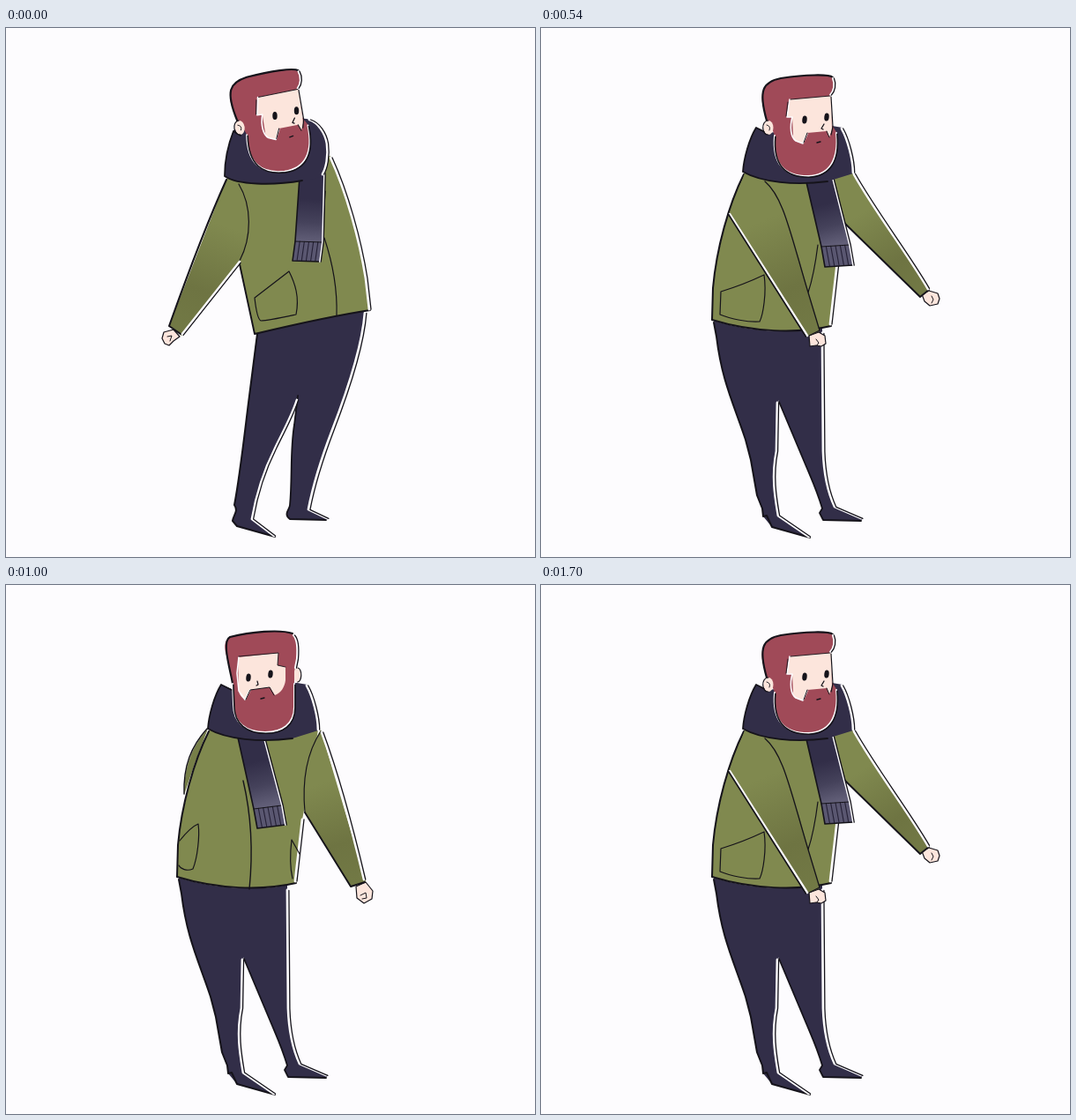
An HTML page with a canvas that plays this animation: 600x600 px, repeating every 2000 ms.

```html
<!DOCTYPE html>
<html lang="en">
<head>
<meta charset="utf-8">
<title>Bearded man swaying</title>
<style>
html, body { margin: 0; width: 100%; height: 100%; overflow: hidden; background: #fdfcfe; }
canvas { display: block; width: 600px; height: 600px; }
</style>
</head>
<body>
<canvas id="stage" width="600" height="600"></canvas>
<script>
const ctx = document.getElementById('stage').getContext('2d');
const PAPER = '#fdfcfe', INK = '#15131a', NAVY = '#322e48', GREEN = '#80894f';
const SHADE = '#6e7442', HAIR = '#a04a58', SKIN = '#fce5dc';
ctx.lineJoin = ctx.lineCap = 'round';

function fill(color, d) {
  ctx.fillStyle = color;
  ctx.fill(new Path2D(d));
}

function line(d, width = 1.2, color = INK) {
  ctx.strokeStyle = color;
  ctx.lineWidth = width;
  ctx.stroke(new Path2D(d));
}

// Paper-coloured gap with a thin pen line just outside it.
function rim(d, dx = 1.9, dy = 0.4, gap = 2.8) {
  line(d, gap, PAPER);
  ctx.save();
  ctx.translate(dx, dy);
  line(d, 1.3);
  ctx.restore();
}

function fade(x0, y0, x1, y1, stops) {
  const g = ctx.createLinearGradient(x0, y0, x1, y1);
  stops.forEach(([at, color]) => g.addColorStop(at, color));
  return g;
}

function sleeve(d, x0, y0, x1, y1) {
  fill(fade(x0, y0, x1, y1, [[0.25, GREEN], [0.7, SHADE], [1, '#727945']]), d);
}

function hand(d, fingers) {
  fill(SKIN, d);
  line(d, 1.2);
  line(fingers, 1);
}

function eyes(x1, y1, x2, y2) {
  ctx.fillStyle = INK;
  for (const [x, y] of [[x1, y1], [x2, y2]]) {
    ctx.beginPath();
    ctx.ellipse(x, y, 2.7, 4.6, 0.1, 0, 7);
    ctx.fill();
  }
}

function ear(x, y, rx, ry, side) {
  ctx.beginPath();
  ctx.ellipse(x, y, rx, ry, 0, 0, 7);
  ctx.fillStyle = SKIN;
  ctx.fill();
  ctx.strokeStyle = INK;
  ctx.lineWidth = 1.2;
  ctx.beginPath();
  ctx.ellipse(x + side * 0.8, y, rx, ry, 0, side < 0 ? 1.5 : -1.5, side < 0 ? 4.8 : 1.6);
  ctx.stroke();
}

// Hanging scarf end: corners run top-left, top-right, bottom-right, bottom-left.
function scarfTail(a, b, c, d, drop) {
  const [dx, dy] = drop;
  const g = fade((a[0] + b[0]) / 2, a[1], (c[0] + d[0]) / 2, c[1],
    [[0.35, NAVY], [0.7, '#45425b'], [1, '#625f78']]);
  fill(g, `M${a}L${b}L${c}L${d}Z`);
  const c2 = [c[0] + dx, c[1] + dy], d2 = [d[0] + dx, d[1] + dy];
  fill('#5a5771', `M${d}L${c}L${c2}L${d2}Z`);
  for (let i = 1; i < 6; i++) {
    const k = i / 6, x = d[0] + (c[0] - d[0]) * k, y = d[1] + (c[1] - d[1]) * k;
    line(`M${x} ${y}l${dx} ${dy - 1}`, 1.1, '#252136');
  }
  line(`M${d}L${c}`, 1.2);
  line(`M${a}L${d}L${d2}L${c2}`, 1.6);
  rim(`M${b}L${c}L${c2}`, 1.2, 0, 1.8);
}

function legsRight() {
  fill(NAVY, 'M285 343L407 320C404 362 387 412 370 456C357 490 348 520 343 546L365 556L364 558L322 557C314 551 322 546 322 541C325 510 322 480 327 450L331 416C325 440 314 458 305 477C291 505 284 528 279 557L306 577L262 565L257 559C258 552 264 548 259 541C265 510 270 465 275 425Z');
  line('M285 347L275 425C270 465 265 510 259 541C264 548 258 552 257 559L262 565L305 577', 2);
  line('M331 417L327 450C322 480 325 510 322 541C322 546 314 551 322 557L363 558', 1.8);
  rim('M407 323C404 362 387 412 370 456C357 490 348 520 343 546L364 556');
  rim('M330 422C324 441 314 458 305 477C291 505 284 528 279 557L304 576', 1.6, 0);
}

function legsLeft() {
  fill(NAVY, 'M196 332C235 345 290 347 319 340L320 480C321 510 327 530 333 543L365 556L363 559L320 558L316 550L319 545C313 525 307 512 302 500L269 422L268 480C262 510 267 535 270 553L306 578L262 566L252 554L251 545L245 530L238 490L232 467C218 425 205 400 199 350Z');
  line('M196 334L199 350C205 400 218 425 232 467L238 490L245 530L251 545L252 554L256 553L262 566L305 578', 2);
  line('M270 424L302 500C307 512 313 525 319 545L316 550L320 558L363 559', 1.8);
  rim('M319 346L320 480C321 510 327 530 333 543L363 556');
  rim('M268 425L267 480C261 510 266 535 269 553L304 577', 1.6, 0);
}

function coatRight() {
  fill(GREEN, 'M250 171L368 145C386 185 402 240 409 284L413 320C380 325 320 338 282 347L264 266Z');
  line('M265 268L282 347C320 338 380 325 413 320', 1.9);
  rim('M368 147C386 186 401 240 408 284L412 319', 2, 0);
}

function armBack() {
  hand('M190 342L179 345L177 352L180 358L185 360L190 355L197 350Z', 'M183 350L188 349L186 355');
  sleeve('M250 171L185 338L199 349L265 265C278 235 278 200 264 177Z', 252, 180, 192, 342);
  line('M250 172C230 216 205 282 185 338L198 347', 2);
  line('M264 177C279 202 279 237 265 264', 1.2);
  rim('M265 265L200 347', 1.1, 1.3);
}

function scarfLoopRight() {
  fill(NAVY, 'M258 116C252 132 248 150 248 168C262 178 302 179 336 173C348 172 356 170 360 166C366 154 368 130 360 119C356 110 350 105 341 103L290 100Z');
  line('M266 122L258 117C252 132 248 150 248 168C262 178 302 179 336 173', 1.8);
  rim('M344 104C354 107 362 119 364 131C366 146 363 159 359 166', 1.6, 0);
}

function coatLeft() {
  fill(GREEN, 'M231 164C214 198 200 250 195 295L194 331C240 345 290 347 329 338L336 266L345 220L354 164Z');
  line('M230 166C213 200 199 250 195 295L194 331C240 345 290 347 329 338', 2);
  rim('M336 266L328 336', 2, 0);
}

function scarfLoopLeft() {
  fill(NAVY, 'M244 113C236 126 230 148 229 163C250 175 288 179 325 174L354 165C355 150 348 124 342 113L330 111L290 115L258 119Z');
  line('M258 120L244 113C236 126 230 148 229 163C250 175 288 179 325 174', 1.8);
  rim('M341 114C348 126 354 150 354 164', 1.7, 0);
}

// Narrow pale seam around the beard, with the pen line outside it.
function beardLine(d) {
  line(d, 1.9, PAPER);
  ctx.save();
  ctx.translate(0.9, 1.3);
  line(d, 1.6);
  ctx.restore();
}

function headSide() {
  fill(HAIR, 'M252 90C246 64 260 57 290 55C312 53 328 53 331 57C334 64 333 72 328 77L330 110L335 118C338 150 327 167 303 168C276 168 262 154 265 122C262 112 254 104 252 90Z');
  line('M256 105C246 70 252 61 272 57C300 53 326 52 331 56', 2.2);
  rim('M331 57C334 64 332 72 328 76', 1.4, 0, 2.2);
  fill(SKIN, 'M282 81L329 77L330 116L327 124L324 117L302 119L298 131C291 130 287 128 286 123L285 101L279 101Z');
  line('M282 81L279 101L285 101C282 112 283 124 289 128L297 131L302 120', 1.6, PAPER);
  line('M283 81L328 77M280 84L278 100', 0.9);
  line('M329 78L331 112L329 121', 1.2);
  ear(258, 113, 5.5, 8, -1);
  line('M256 110Q261 111 259 116', 0.9);
  eyes(299, 104, 324, 101);
  line('M321 109L318 114L320 115', 1.3);
  line('M313 130L317 129', 1.3);
  line('M302 119L298 130M324 117L327 124', 1);
  beardLine('M335 119C338 150 327 167 303 168C276 168 262 154 265 122');
}

function headTilted() {
  ctx.save();
  ctx.translate(313, 163);
  ctx.rotate(-0.11);
  ctx.translate(-300, -168);
  headSide();
  ctx.restore();
}

function headTurning() {
  ear(267, 113, 4, 8, -1);
  ear(339, 96, 3, 7, 1);
  fill(HAIR, 'M256 80C251 62 262 56 285 52C305 48 320 45 326 49C333 53 335 62 335 75L338 95L345 115C349 148 335 163 311 163C286 163 270 148 273 118C268 105 260 98 256 80Z');
  line('M266 107C253 82 251 63 265 57C287 51 316 46 325 48', 2.2);
  rim('M326 49C333 53 334 62 334 75L337 92', 1.6, 0, 2.2);
  fill(SKIN, 'M277 80L325 70L327 83L333 84L334 104L327 121L323 111L303 114L299 126C290 126 283 122 282 118L281 98L275 98Z');
  line('M277 80L275 98L281 98C278 108 279 119 285 123L298 127L303 114', 1.6, PAPER);
  line('M278 80L324 71L327 83L333 85', 0.9);
  eyes(296, 101, 321, 97);
  line('M313 104L314 109L312 110', 1.2);
  line('M314 124L318 123', 1.3);
  line('M299 126L303 114L323 111L326 119', 1);
  beardLine('M345 117C349 148 335 163 311 163C286 163 270 148 273 118');
}

function headFront() {
  ear(330, 102, 4, 8, 1);
  fill(HAIR, 'M250 80C246 66 249 58 262 57C290 52 318 51 325 56C331 62 332 72 330 84L327 98L327 138C327 158 313 167 294 167C272 167 258 156 258 136L257 110C254 102 253 92 250 80Z');
  line('M257 112C255 98 244 64 254 59C277 53 311 50 325 55', 2.1);
  rim('M326 57C331 62 331 72 330 84L328 94', 1.5, 0, 2.2);
  fill(SKIN, 'M263 82L309 77L308 91L317 93L317 108C316 116 312 122 305 125L299 116L277 119L272 130C267 128 264 124 264 118Z');
  line('M264 82L262 100L264 120L271 130L277 119', 1.6, PAPER);
  line('M264 81L309 77L308 91L317 93', 0.9);
  eyes(275, 105, 300, 101);
  line('M285 109L286 113L284 114', 1.2);
  line('M289 129L293 128', 1.3);
  line('M272 130L277 119L299 116L304 125', 1);
  beardLine('M327 112L327 138C327 158 313 167 294 167C272 167 258 156 258 136L257 112');
}

function leanBack() {
  legsRight();
  coatRight();
  line('M361 238C370 265 376 295 375 326M362 185L359 238');
  line('M282 306L321 276C328 290 333 305 329 325C315 328 297 332 289 332C285 330 283 315 282 306Z');
  armBack();
  scarfTail([333, 168], [361, 165], [359, 243], [328, 242], [-3, 22]);
  scarfLoopRight();
  headTilted();
}

function reachForward() {
  legsLeft();
  coatLeft();
  line('M314 246C311 270 307 288 303 300');
  line('M204 299Q230 291 253 280C256 300 252 325 248 333C235 334 215 330 203 325Z');
  hand('M432 302L440 298L450 301L452 307L450 313L441 315L435 310Z', 'M443 304L445 308L443 312');
  sleeve('M354 163L440 298L430 305L344 221L335 190Z', 352, 172, 434, 300);
  line('M344 221L430 305L440 297', 1.9);
  rim('M355 166C380 210 415 255 439 296', 1.5, -0.7);
  hand('M304 349L315 345L322 349L323 358L318 361L312 360L305 361Z', 'M312 353L315 357L313 360');
  sleeve('M231 165L214 210L302 350L316 344L303 300C288 245 276 190 256 174Z', 236, 175, 308, 345);
  line('M254 174C275 192 282 230 303 300L316 343L304 349', 1.3);
  line('M214 211L302 349', 2.6, PAPER);
  line('M212.4 211L300.4 350', 1.6);
  scarfTail([301, 175], [331, 171], [350, 246], [318, 248], [4, 23]);
  scarfLoopLeft();
  headSide();
}

function turnMidway() {
  legsRight();
  coatRight();
  line('M343 249C349 280 354 305 356 331');
  line('M276 308L305 282C309 300 313 315 311 331C300 334 289 336 285 332C280 325 277 316 276 308Z');
  armBack();
  hand('M379 314L375 319L372 325L376 330L383 331L390 326L391 319Z', 'M374 325L380 322L380 327');
  sleeve('M368 147L432 224Q436 231 433 239L410 290L392 320L376 314L394 214Z', 385, 165, 386, 318);
  line('M372 154L394 214L377 313L391 319', 1.8);
  rim('M369 148L431 224Q435 231 432 239L409 290L392 319', 1.6, 0.4);
  scarfTail([314, 172], [345, 170], [339, 250], [308, 249], [-2, 22]);
  scarfLoopRight();
  headTurning();
}

function faceAway() {
  legsLeft();
  fill('#767e48', 'M229 163C211 183 202 205 202 238L215 200Z');
  line('M228 163C210 183 201 205 202 237', 1.4);
  coatLeft();
  line('M269 222C278 260 280 305 276 345', 1.4);
  line('M197 290C205 280 213 273 218 271C220 285 217 310 212 322C205 325 198 322 196 318');
  line('M333 305L324 289C322 305 322 320 325 333');
  hand('M397 342L408 337L416 347L415 356L406 361L398 355Z', 'M402 352L408 349L409 355L404 356');
  sleeve('M357 164L408 336L391 343L339 258C336 225 340 192 357 164Z', 352, 185, 399, 338);
  line('M357 166C340 192 336 225 339 258', 1.2);
  line('M339 258L391 342L407 337', 1.9);
  rim('M358 167C374 210 392 275 406 334', 1.8, 0);
  scarfTail([263, 173], [293, 175], [313, 250], [281, 254], [4, 22]);
  scarfLoopLeft();
  headFront();
}

const timeline = [
  [300, leanBack], [700, reachForward], [1000, turnMidway],
  [1300, faceAway], [1700, turnMidway], [2000, reachForward]
];

function tick() {
  const t = performance.now() % 2000;
  ctx.fillStyle = PAPER;
  ctx.fillRect(0, 0, 600, 600);
  timeline.find(([end]) => t < end)[1]();
  requestAnimationFrame(tick);
}
tick();
</script>
</body>
</html>
```
